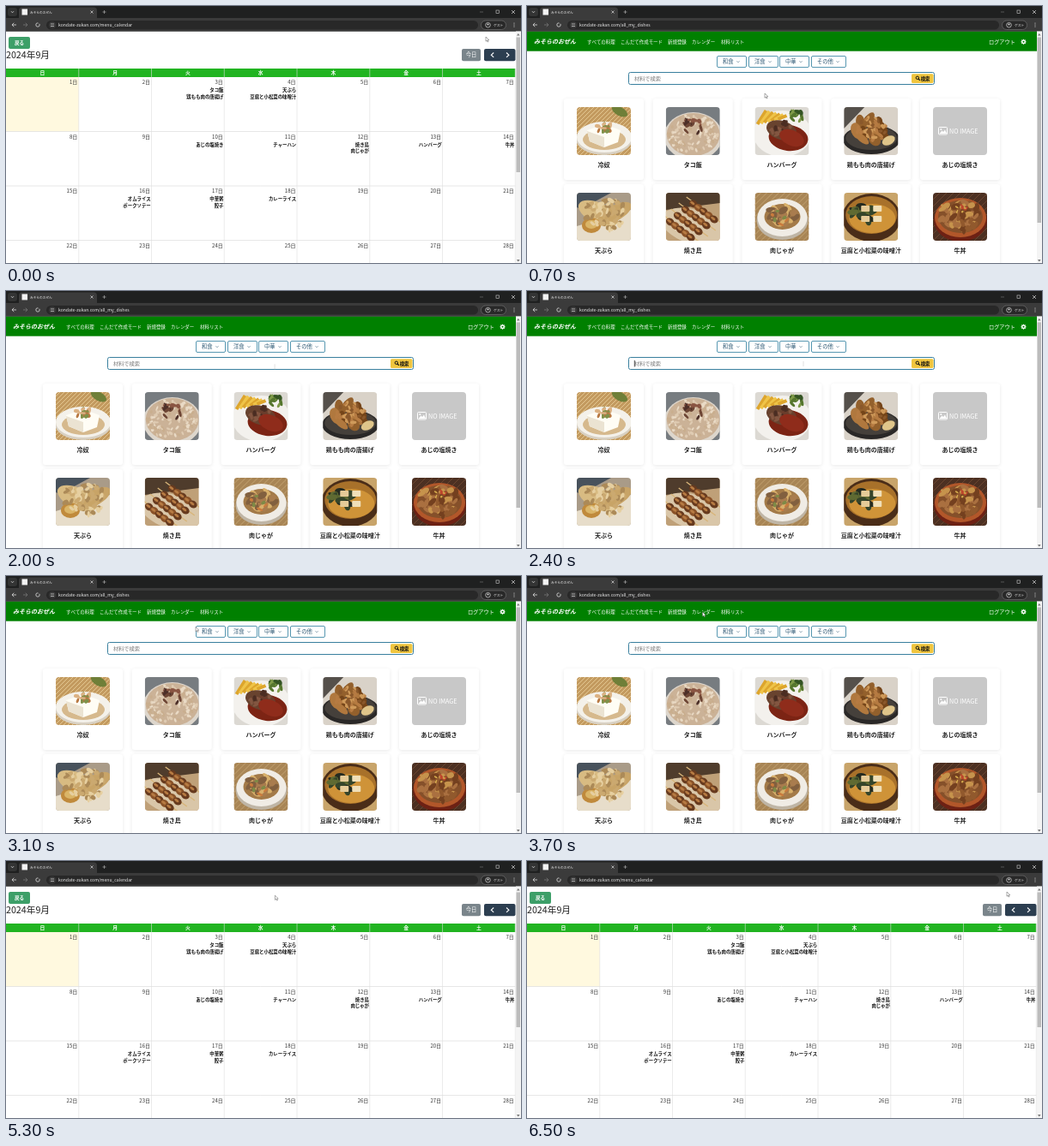
Animation of 600 by 300 pixels, one loop 6.6 s. Source, as an HTML page with a canvas:

```html
<!DOCTYPE html>
<html lang="ja">
<head>
<meta charset="utf-8">
<title>みそらのおぜん</title>
<style>
html, body { margin: 0; width: 100%; height: 100%; overflow: hidden; background: #fff; }
canvas { display: block; width: 600px; height: 300px; }
</style>
</head>
<body>
<canvas id="stage"></canvas>
<script>
const W = 600, H = 300, LOOP = 6600, STEP = 100;
const FAMILY = '"Noto Sans CJK JP", "Noto Sans CJK", "Noto Sans", sans-serif';
const SITE = 'みそらのおぜん';
const DPR = window.devicePixelRatio || 1;
const stage = document.getElementById('stage');
let ctx;

function prepare(canvas) {
  canvas.width = W * DPR;
  canvas.height = H * DPR;
  const c = canvas.getContext('2d');
  c.scale(DPR, DPR);
  return c;
}

function rect(x, y, w, h, color) {
  ctx.fillStyle = color;
  ctx.fillRect(x, y, w, h);
}

function round(x, y, w, h, r, fill, stroke, width = 1) {
  ctx.beginPath();
  ctx.roundRect(x, y, w, h, r);
  if (fill) { ctx.fillStyle = fill; ctx.fill(); }
  if (stroke) { ctx.strokeStyle = stroke; ctx.lineWidth = width; ctx.stroke(); }
}

function line(color, width, ...p) {
  ctx.beginPath();
  for (let i = 0; i < p.length; i += 2) ctx.lineTo(p[i], p[i + 1]);
  ctx.strokeStyle = color;
  ctx.lineWidth = width;
  ctx.stroke();
}

function poly(color, ...p) {
  ctx.beginPath();
  for (let i = 0; i < p.length; i += 2) ctx.lineTo(p[i], p[i + 1]);
  ctx.closePath();
  ctx.fillStyle = color;
  ctx.fill();
}

function oval(x, y, rx, ry, color, angle = 0) {
  ctx.beginPath();
  ctx.ellipse(x, y, rx, ry, angle, 0, Math.PI * 2);
  ctx.fillStyle = color;
  ctx.fill();
}

function ring(x, y, r, color, width) {
  ctx.beginPath();
  ctx.arc(x, y, r, 0, Math.PI * 2);
  ctx.strokeStyle = color;
  ctx.lineWidth = width;
  ctx.stroke();
}

function text(str, x, y, size, color, align = 'left', style = '') {
  ctx.font = `${style} ${size}px ${FAMILY}`;
  ctx.textAlign = align;
  ctx.fillStyle = color;
  ctx.fillText(str, x, y);
}

function drawBrowser(path, thumbHeight) {
  rect(0, 0, W, 29.5, '#1f2020');
  round(2, 2, 11, 10, 3, '#333434');
  line('#ddd', 0.8, 6, 6.2, 7.5, 7.8, 9, 6.2);
  round(15, 1.5, 91, 16, 4, '#3b3b3b');
  rect(0, 14, W, 15.5, '#3b3b3b');
  rect(18.5, 3.5, 6.5, 7, '#f4f4f4');
  text(SITE, 28, 8.6, 3.7, '#eee');
  line('#ddd', 0.7, 98.5, 5.5, 101.5, 8.5);
  line('#ddd', 0.7, 101.5, 5.5, 98.5, 8.5);
  line('#aaa', 0.7, 112.5, 7, 116.5, 7);
  line('#aaa', 0.7, 114.5, 5, 114.5, 9);
  line('#777', 0.6, 552, 7, 556, 7);
  ctx.strokeStyle = '#ccc';
  ctx.strokeRect(571, 5, 3.6, 3.6);
  line('#ddd', 0.7, 589, 5, 593, 9);
  line('#ddd', 0.7, 593, 5, 589, 9);

  line('#ddd', 0.8, 12, 22, 7, 22);
  line('#ddd', 0.8, 9.3, 19.7, 7, 22, 9.3, 24.3);
  line('#777', 0.8, 20, 22, 25, 22);
  line('#777', 0.8, 22.7, 19.7, 25, 22, 22.7, 24.3);
  ring(37, 22, 2.2, '#ddd', 0.8);
  rect(37.5, 19, 2, 1.8, '#3b3b3b');
  round(47, 17, 503, 10.5, 5.2, '#282828');
  oval(54, 22.2, 4, 4, '#3b3b3b');
  line('#ddd', 0.7, 52, 21, 56, 21);
  line('#ddd', 0.7, 52, 23.5, 56, 23.5);
  text('kondate-zukan.com' + path, 61, 24, 5.07, '#eee');
  round(553.5, 17, 29, 10.5, 5.2, '#282828', '#777', 0.6);
  ring(561.5, 22.2, 2.8, '#ddd', 0.7);
  oval(561.5, 21.6, 1, 1, '#ddd');
  text('ゲスト', 568, 23.8, 3.8, '#eee');
  for (const y of [20, 22, 24]) oval(592, y, 0.55, 0.55, '#ddd');

  rect(594, 29.5, 6, 270.5, '#f4f4f4');
  rect(594.5, 36.5, 4.5, thumbHeight, '#bcbcbc');
  poly('#777', 595, 34.5, 596.8, 32, 598.6, 34.5);
  poly('#777', 595, 296, 596.8, 298.5, 598.6, 296);
}

const MENUS = {
  3: ['タコ飯', '鶏もも肉の唐揚げ'],
  4: ['天ぷら', '豆腐と小松菜の味噌汁'],
  10: ['あじの塩焼き'],
  11: ['チャーハン'],
  12: ['焼き鳥', '肉じゃが'],
  13: ['ハンバーグ'],
  14: ['牛丼'],
  16: ['オムライス', 'ポークソテー'],
  17: ['中華粥', '餃子'],
  18: ['カレーライス'],
};

function drawCalendar() {
  const colW = 593.3 / 7, rowH = 63.5, top = 83;
  rect(0, 0, W, H, '#fff');
  round(3, 36, 25, 14, 2, '#3d9f68');
  text('戻る', 15.5, 45.1, 5.6, '#fff', 'center', 'bold');
  text('2024年9月', 0, 61, 10.7, '#222');
  round(531, 50, 22, 14.3, 2, '#7a858b');
  text('今日', 542, 59.4, 6.3, '#fff', 'center');
  round(557, 50, 36.5, 14.3, 2, '#2c3e50');
  line('#fff', 1.1, 568.2, 54.5, 565.3, 57.2, 568.2, 59.9);
  line('#fff', 1.1, 583, 54.5, 585.9, 57.2, 583, 59.9);

  rect(0, top, colW, rowH, '#fff9df');
  rect(0, 73, 593.3, 10, '#21b421');
  [...'日月火水木金土'].forEach((day, i) => {
    text(day, (i + 0.5) * colW, 80.2, 5.8, '#fff', 'center', 'bold');
    line('#ddd', 0.6, (i + 1) * colW, 73, (i + 1) * colW, H);
  });
  for (let row = 0; row < 4; row++) {
    const y = top + row * rowH;
    if (row) line('#ddd', 0.7, 0, y, 593.3, y);
    for (let col = 0; col < 7; col++) {
      const date = row * 7 + col + 1, right = (col + 1) * colW;
      text(date + '日', right - 1.5, y + 8.2, 6, '#333', 'right');
      (MENUS[date] || []).forEach((name, i) =>
        text(name, right - 0.8, y + 17.3 + i * 7.5, 5.4, '#111', 'right', 'bold'));
    }
  }
  drawBrowser('/menu_calendar', 157.5);
}

// Scatters small pieces inside an oval, always in the same places.
function scatter(count, x, y, rx, ry, size, colors) {
  let seed = count * 97 + 13;
  const random = () => (seed = (seed * 16807) % 2147483647) / 2147483647;
  for (let i = 0; i < 5; i++) random();
  for (let i = 0; i < count; i++) {
    const a = random() * Math.PI * 2, d = Math.sqrt(random());
    oval(x + Math.cos(a) * d * rx, y + Math.sin(a) * d * ry,
      size * (0.7 + random() * 0.6), size * (0.4 + random() * 0.4),
      colors[i % colors.length], random() * Math.PI);
  }
}

function stripes(color, gap) {
  for (let x = -56; x < 63; x += gap) line(color, 1, x, 56, x + 56, 0);
}

// Photo tiles are 63 x 56.
const DISHES = [
  ['冷奴', () => {
    rect(0, 0, 63, 56, '#c39a5f');
    stripes('#e3c791', 5);
    oval(50, 5, 10, 5, '#6f7f38', 0.5);
    oval(32, 37, 33, 19, '#d8d0c2');
    oval(32, 35, 32, 18, '#f4f1ea');
    oval(32, 38, 25, 12, '#d6b98d');
    poly('#fffdf5', 12, 27, 32, 20, 51, 27, 48, 41, 32, 47, 15, 40);
    poly('#ebe3d2', 12, 28, 32, 35, 32, 47, 15, 40);
    scatter(18, 32, 24, 11, 5, 3, ['#b97a45', '#dcb284', '#7f914a']);
  }],
  ['タコ飯', () => {
    rect(0, 0, 63, 56, '#777c80');
    oval(32, 34, 34, 28, '#ddd6cc');
    oval(32, 32, 31, 25, '#cbb297');
    scatter(130, 32, 32, 29, 23, 2.3, ['#dfcbb2', '#c9ae8e', '#e9dac5']);
    scatter(16, 32, 22, 14, 9, 3.2, ['#6e4635', '#4d3029', '#8a5542']);
  }],
  ['ハンバーグ', () => {
    rect(0, 0, 63, 56, '#dcd9d3');
    oval(32, 31, 34, 27, '#f3f1ed');
    for (let i = 0; i < 7; i++) line(i % 2 ? '#efc448' : '#dda52c', 4, 3 + i * 4, 20 - i, 13 + i * 4, 4 + i);
    scatter(16, 49, 10, 9, 6, 3.5, ['#55762d', '#7f9a48', '#345423']);
    oval(39, 36, 23, 15, '#7c2414', 0.12);
    oval(31, 27, 18, 11, '#68432f', 0.3);
    scatter(24, 32, 26, 15, 9, 3, ['#835641', '#4b2d22', '#6b3d2c']);
    oval(43, 36, 15, 9, '#8f2c1b', 0.4);
  }],
  ['鶏もも肉の唐揚げ', () => {
    rect(0, 0, 63, 56, '#d9d2c8');
    poly('#55504b', 0, 0, 24, 0, 0, 25);
    oval(32, 38, 33, 17, '#2a2827');
    oval(32, 36, 30, 14, '#45403b');
    scatter(20, 31, 27, 18, 13, 8, ['#93602c', '#b0783e', '#754519']);
    scatter(40, 31, 25, 18, 13, 3, ['#cf9a5a', '#8a582b', '#b67b42']);
    oval(52, 39, 8, 5, '#dfc58a', -0.5);
  }],
  ['あじの塩焼き', () => {
    rect(0, 0, 63, 56, '#c8c8c8');
    round(6.5, 23.5, 10, 8.5, 1, null, '#fff', 1);
    poly('#fff', 7.5, 31, 10.5, 27.5, 12, 29, 14, 26.5, 16, 31);
    oval(9.3, 26, 1, 1, '#fff');
    text('NO IMAGE', 19, 30.6, 7.2, '#fff');
  }],
  ['天ぷら', () => {
    rect(0, 0, 63, 56, '#a99b88');
    poly('#48525c', 0, 0, 40, 0, 5, 19, 0, 17);
    poly('#e7ddca', 0, 39, 63, 20, 63, 56, 0, 56);
    oval(25, 24, 25, 12, '#d8bb82', 0.45);
    oval(44, 24, 22, 9, '#c8a467', -0.5);
    oval(17, 38, 11, 9, '#c08a3c');
    oval(17, 37, 7, 5, '#dab568');
    scatter(60, 34, 25, 25, 18, 3.5, ['#e6cfa0', '#cba970', '#ac8a58']);
  }],
  ['焼き鳥', () => {
    rect(0, 0, 63, 56, '#bfa078');
    poly('#4f3c2c', 0, 0, 63, 0, 63, 12, 0, 20);
    oval(33, 40, 40, 20, '#d9c6a8', 0.3);
    for (let i = 0; i < 4; i++) {
      const x = 5 + i * 9, y = 34 - i * 7;
      line('#d8b579', 1.4, x - 8, y - 8, x + 35, y + 24);
      for (let k = 0; k < 5; k++) {
        oval(x + k * 6, y + k * 4.5, 5.2, 4.2, k % 2 ? '#8a5228' : '#673a1e', 0.6);
        oval(x - 1 + k * 6, y - 1 + k * 4.5, 3, 1.5, '#b67a42', 0.6);
      }
    }
  }],
  ['肉じゃが', () => {
    rect(0, 0, 63, 56, '#a88555');
    stripes('#c2a271', 7);
    oval(32, 32, 30, 23, '#bfb5a5');
    oval(32, 29, 29, 22, '#f0ece5');
    oval(32, 28, 21, 15, '#a37a48');
    scatter(27, 32, 26, 16, 11, 5, ['#d8b06b', '#a97c4e', '#82603f']);
    scatter(6, 33, 27, 15, 10, 3, ['#c97b3d', '#7e8a46']);
  }],
  ['豆腐と小松菜の味噌汁', () => {
    rect(0, 0, 63, 56, '#c8a46a');
    oval(32, 29, 34, 28, '#4a2d18');
    oval(32, 26, 30, 22, '#a8712a');
    oval(33, 30, 27, 17, '#cf9338');
    scatter(13, 22, 24, 13, 9, 6, ['#35452a', '#252b20', '#5f6a32']);
    for (let i = 0; i < 4; i++) round(20 + i % 2 * 14, 15 + (i > 1) * 12, 10, 7, 1, i % 2 ? '#f0dfb8' : '#e5cb98');
  }],
  ['牛丼', () => {
    rect(0, 0, 63, 56, '#4c3022');
    stripes('#6b4630', 8);
    oval(32, 32, 31, 25, '#6d2114');
    oval(32, 29, 30, 23, '#b2572a');
    oval(32, 28, 26, 19, '#85502a');
    scatter(60, 32, 27, 24, 17, 4.6, ['#aa7040', '#74401f', '#c6934c', '#91592d']);
    scatter(8, 34, 19, 8, 5, 2, ['#bd452c', '#d2a84b']);
  }],
];

function drawCard([name, paint], i) {
  const x = 43 + i % 5 * 103.75, y = i < 5 ? 108 : 208;
  ctx.save();
  ctx.shadowColor = 'rgba(0,0,0,.09)';
  ctx.shadowBlur = 4 * DPR;
  ctx.shadowOffsetY = DPR;
  round(x, y, 93, 95, 3, '#fff');
  ctx.restore();
  ctx.save();
  ctx.translate(x + 15, y + 10);
  ctx.beginPath();
  ctx.roundRect(0, 0, 63, 56, 4);
  ctx.clip();
  paint();
  ctx.restore();
  text(name, x + 46.5, y + 79.7, 7, '#222', 'center', 'bold');
}

function drawGear(x, y) {
  for (let i = 0; i < 4; i++) {
    const a = i * Math.PI / 4, dx = Math.cos(a) * 3, dy = Math.sin(a) * 3;
    line('#fff', 1.2, x - dx, y - dy, x + dx, y + dy);
  }
  oval(x, y, 2.3, 2.3, '#fff');
  oval(x, y, 1, 1, '#008000');
}

function drawDishes() {
  rect(0, 0, W, H, '#fff');
  rect(0, 29.5, 594, 23.2, '#008000');
  text(SITE, 8, 44.3, 7, '#fff', 'left', 'italic bold');
  const links = [['すべての料理', 70], ['こんだて作成モード', 109], ['新規登録', 164], ['カレンダー', 192], ['材料リスト', 226]];
  for (const [label, x] of links) text(label, x, 43.8, 5.45, '#fff');
  text('ログアウト', 538, 44.2, 6.2, '#fff');
  drawGear(578.5, 41.8);

  const filters = [['和食', 221.5, 34], ['洋食', 258.5, 34], ['中華', 294.5, 34], ['その他', 331.5, 40]];
  for (const [label, x, w] of filters) {
    round(x, 58.5, w, 13, 1.5, '#fff', '#468daa', 0.9);
    text(label, x + 6.5, 67.3, 6.3, '#2d5874');
    const c = x + w - 9.5;
    line('#51758a', 0.7, c - 1.5, 64.3, c, 65.8, c + 1.5, 64.3);
  }

  round(118.5, 77.5, 356, 14, 2, '#fff', '#397f9e', 1);
  text('材料で検索', 125, 87, 6.2, '#777');
  round(448, 79.3, 25.5, 10.7, 1.5, '#f0c53e');
  ring(454.8, 83.8, 1.7, '#111', 1);
  line('#111', 1.1, 456, 85, 457.8, 86.8);
  text('検索', 458.7, 86.7, 5.4, '#111', 'left', 'bold');
  DISHES.forEach(drawCard);
  drawBrowser('/all_my_dishes', 216.5);
}

function render(draw) {
  const canvas = document.createElement('canvas');
  ctx = prepare(canvas);
  draw();
  return canvas;
}

const calendarPage = render(drawCalendar);
const dishesPage = render(drawDishes);
const screen = prepare(stage);

// Page changes and pointer stops: time, x, y.
const DISHES_FROM = 100, DISHES_TO = 3900;
const PATH = [
  [DISHES_FROM, 277, 102], [1500, 277, 102], [2200, 322, 85], [2500, 322, 85],
  [3100, 221, 59.5], [3400, 204.5, 42], [4600, 204.5, 42], [6500, 559, 36],
];

function pointerAt(t) {
  const last = PATH[PATH.length - 1];
  if (t < PATH[0][0] || t >= last[0]) return last.slice(1);
  const i = PATH.findIndex(stop => stop[0] > t);
  const [t0, x0, y0] = PATH[i - 1], [t1, x1, y1] = PATH[i];
  const k = (t - t0) / (t1 - t0), e = k * k * (3 - 2 * k);
  return [x0 + (x1 - x0) * e, y0 + (y1 - y0) * e];
}

function drawPointer(x, y, overInput) {
  if (overInput) {
    line('#ccc', 0.6, x, y - 3, x, y + 3);
    return;
  }
  const shape = [x, y, x, y + 5.2, x + 1.3, y + 4.1, x + 2.2, y + 6, x + 3, y + 5.6, x + 2.2, y + 3.8, x + 3.8, y + 3.7];
  poly('#fff', ...shape);
  line('#555', 0.5, ...shape, x, y);
}

function frame(now) {
  const t = Math.floor(now % LOOP / STEP) * STEP;
  const onDishes = t >= DISHES_FROM && t < DISHES_TO;
  ctx = screen;
  ctx.drawImage(onDishes ? dishesPage : calendarPage, 0, 0, W, H);
  if (t >= 2300 && t < 2900) line('#222', 0.8, 125.3, 81, 125.3, 88.5);
  const [x, y] = pointerAt(t);
  drawPointer(x, y, onDishes && y > 78 && y < 91 && x < 447);
  requestAnimationFrame(frame);
}
requestAnimationFrame(frame);
</script>
</body>
</html>
```
